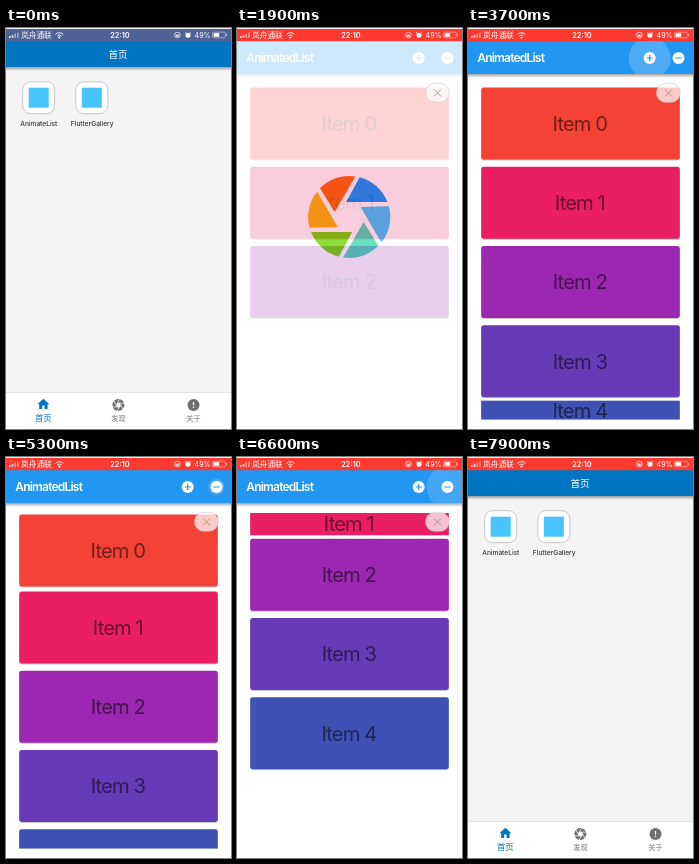
An HTML page for the animation above (8 s loop, 225x401 px).

```html
<!DOCTYPE html>
<html lang="zh-CN">
<head>
<meta charset="utf-8">
<title>AnimatedList</title>
<style>
  html, body { margin: 0; width: 100%; height: 100%; overflow: hidden; background: #fff; }
  #stage { display: block; width: 100%; height: 100%; }
  text { font-family: Inter, 'Noto Sans CJK SC', 'Noto Sans CJK', sans-serif; }
  .mid { text-anchor: middle; }
  .label { font-size: 6.6px; font-weight: 500; fill: #333; }
  .title { font-size: 12px; font-weight: 600; fill: #fff; letter-spacing: -.8px; }
  .item { font-size: 20.2px; letter-spacing: -.9px; }
</style>
</head>
<body>
<svg id="stage" viewBox="0 0 225 401" preserveAspectRatio="none">
  <defs>
    <linearGradient id="shade" x2="0" y2="1">
      <stop stop-color="#000" stop-opacity=".35"/>
      <stop offset="1" stop-color="#000" stop-opacity="0"/>
    </linearGradient>
    <clipPath id="barClip"><rect width="225" height="46"/></clipPath>
    <g id="app">
      <rect x="-16" y="-16" width="32" height="32" rx="8" fill="#fff" stroke="#b4b4b4" stroke-width=".7"/>
      <rect x="-10" y="-10" width="20" height="20" fill="#47c5fb"/>
    </g>
  </defs>

  <g id="home">
    <rect width="225" height="401" fill="#f4f4f4"/>
    <rect y="39" width="225" height="4" fill="url(#shade)"/>
    <rect width="225" height="39" fill="#0175c2"/>
    <text class="mid" x="112" y="30" font-size="9.6" font-weight="500" fill="#fff">首页</text>
    <use href="#app" x="32.7" y="69.7"/>
    <use href="#app" x="85.8" y="69.7"/>
    <text class="label mid" x="32.8" y="98.2">AnimateList</text>
    <text class="label mid" x="86.2" y="98.2">FlutterGallery</text>
    <rect y="364.5" width="225" height="37" fill="#fff"/>
    <rect y="364" width="225" height=".7" fill="#d8d8d8"/>
    <path transform="translate(30.2 369) scale(.6)" fill="#0175c2" d="M10 20v-6h4v6h5v-8h3L12 3 2 12h3v8z"/>
    <g id="tabShutter" transform="translate(112.4 377) scale(.146)"></g>
    <circle cx="187.5" cy="377" r="6" fill="#6f6f6f"/>
    <path d="M187.5 374v3.6M187.5 378.8v1.2" stroke="#fff" stroke-width="1.2"/>
    <text class="mid" x="37.3" y="392.6" font-size="8.4" fill="#0175c2">首页</text>
    <text class="mid" x="112.4" y="393.4" font-size="7.2" fill="#757575">发现</text>
    <text class="mid" x="187.4" y="393.4" font-size="7.2" fill="#757575">关于</text>
  </g>

  <g id="panel">
    <rect width="225" height="402" fill="#fff"/>
    <g id="shutter" transform="translate(112.2 189)"></g>
    <g id="page">
      <rect width="225" height="402" fill="#fff"/>
      <svg id="list" x="9.6" y="56" width="205.8" height="335.4"></svg>
      <rect y="46" width="225" height="4" fill="url(#shade)"/>
      <rect width="225" height="46" fill="#2196f3"/>
      <text class="title" x="9.3" y="34.3">AnimatedList</text>
      <g id="ripples" fill="#fff" clip-path="url(#barClip)"></g>
      <g fill="#fff"><circle cx="181.7" cy="30" r="6"/><circle cx="210.5" cy="30" r="6"/></g>
      <path d="M178.7 30h6M181.7 27v6M207.5 30h6" stroke="#2196f3" stroke-width="1.2"/>
    </g>
    <rect x="188.4" y="55.3" width="24" height="19" rx="9.5" fill="#fff" fill-opacity=".72" stroke="#c4c4c4" stroke-width=".6"/>
    <path d="M197 61.4l7 7M204 61.4l-7 7" stroke="#8a8a8a" stroke-width=".8"/>
  </g>

  <g id="status">
    <rect width="225" height="1" fill="#f6f0f2"/>
    <rect id="statusBar" y="1" width="225" height="12.2"/>
    <g fill="#fff">
      <path d="M3 8h1.6v2H3zM5.7 7h1.6v3H5.7z" opacity=".75"/>
      <path d="M8.4 5.6H10V10H8.4zM11.1 4.4h1.6V10h-1.6z" opacity=".45"/>
      <text x="15" y="9.9" font-size="7.7">岚舟通联</text>
      <circle cx="53.4" cy="9.4" r="1"/>
      <text class="mid" x="114" y="9.8" font-size="7.3" font-weight="600">22:10</text>
      <text x="188.5" y="9.6" font-size="7.2">49%</text>
      <rect x="207.6" y="5.2" width="5.6" height="3.6"/>
      <rect x="220" y="5.9" width="1" height="2.2" opacity=".6"/>
      <circle cx="182" cy="7.2" r="2.5"/>
      <rect x="170.2" y="6.6" width="2.4" height="2"/>
    </g>
    <g fill="none" stroke="#fff" stroke-width=".9">
      <path d="M49.5 6.3a5.6 5.6 0 0 1 7.8 0M51.2 8a3.2 3.2 0 0 1 4.4 0"/>
      <circle cx="171.4" cy="7" r="2.8" stroke-width=".7"/>
      <path d="M179 5.4l1.3-1.2M185 5.4l-1.3-1.2"/>
      <rect x="206.5" y="4.2" width="12.8" height="5.6" rx="1" stroke-width=".7" opacity=".6"/>
    </g>
  </g>
</svg>
<script>
const NS = 'http://www.w3.org/2000/svg';
const LOOP = 8000, H = 401, CELL = 79.2, SIZE_MS = 300;
const $ = id => document.getElementById(id);
const clamp = v => Math.max(0, Math.min(1, v));
const ramp = (t, start, length) => clamp((t - start) / length);

function make(tag, attrs, parent) {
  const node = document.createElementNS(NS, tag);
  set(node, attrs);
  return parent.appendChild(node);
}
function set(node, attrs) {
  for (const key in attrs) node.setAttribute(key, attrs[key]);
}

function drawShutter(parent, colors) {
  colors.forEach((fill, i) => make('path', {
    d: 'M10.4-39.7A41 41 0 0 1 38.2-15H-3Z', fill, transform: `rotate(${i * 60})`
  }, parent));
}
drawShutter($('shutter'), ['#0091ff', '#32c5ff', '#44d7b6', '#6dd400', '#f7b500', '#fa6400']);
drawShutter($('tabShutter'), Array(6).fill('#6f6f6f'));

// Times at which each item is added, selected and removed
const items = [
  { color: '#f44336', add: -SIZE_MS, pick: 4690, remove: 5285 },
  { color: '#e91e63', add: -SIZE_MS, pick: 5890, remove: 6385 },
  { color: '#9c27b0', add: -SIZE_MS },
  { color: '#673ab7', add: 2625 },
  { color: '#3f51b5', add: 3623 }
];
items.forEach((item, i) => {
  item.cell = make('svg', { width: 205.8 }, $('list'));
  item.body = make('g', {}, item.cell);
  const card = { x: 3.6, width: 198.6, height: 72, rx: 2.4 };
  make('rect', { ...card, y: 4.5, fill: '#000', 'fill-opacity': .22 }, item.body);
  make('rect', { ...card, y: 3.6, fill: item.color }, item.body);
  item.text = make('text', { class: 'item mid', x: 102.3, y: 47 }, item.body);
  item.text.textContent = 'Item ' + i;
});

const ADD_X = 181.7, REMOVE_X = 210.5;
const taps = [[2604, ADD_X], [3602, ADD_X], [5265, REMOVE_X], [6365, REMOVE_X]]
  .map(([start, cx]) => ({ start, dot: make('circle', { cx, cy: 30 }, $('ripples')) }));

// Spring-like decay from 1 to 0
const settle = dt => dt <= 0 ? 1 : clamp(1.01 * Math.exp(-dt / 162) - .01);

function drawList(t) {
  let y = 0;
  for (const { cell, body, text, add, pick = LOOP, remove = LOOP } of items) {
    const h = CELL * ramp(t, add, SIZE_MS) * (1 - ramp(t, remove, SIZE_MS));
    set(cell, { y, height: h });
    set(body, { transform: `translate(0 ${(h - CELL) / 2})` });
    const picked = t >= pick && t < remove;
    set(text, { fill: picked ? '#76ff03' : '#000', 'fill-opacity': picked ? 1 : .54 });
    y += h;
  }
}

function draw(t) {
  const mix = ramp(t, 0, 900), ease = mix * mix * (3 - 2 * mix);
  const rgb = [[78, 98, 150], [254, 58, 48]];
  const fill = rgb[0].map((c, i) => Math.round(c + (rgb[1][i] - c) * ease));
  set($('statusBar'), { fill: `rgb(${fill})` });

  const y = H * (t < 6000 ? settle(t - 950) : 1 - settle(t - 6969));
  set($('panel'), { transform: `translate(0 ${y})` });
  set($('page'), { opacity: ramp(t, 1810, 420) });
  drawList(t);

  for (const { start, dot } of taps) {
    const age = t - start, alpha = age < 0 ? 0 : .2 * (1 - ramp(age, 190, 190));
    set(dot, { r: 21 * ramp(age, 0, 95), 'fill-opacity': alpha });
  }
}

const origin = performance.now();
function tick() {
  draw((performance.now() - origin) % LOOP);
  requestAnimationFrame(tick);
}
tick();
</script>
</body>
</html>
```
